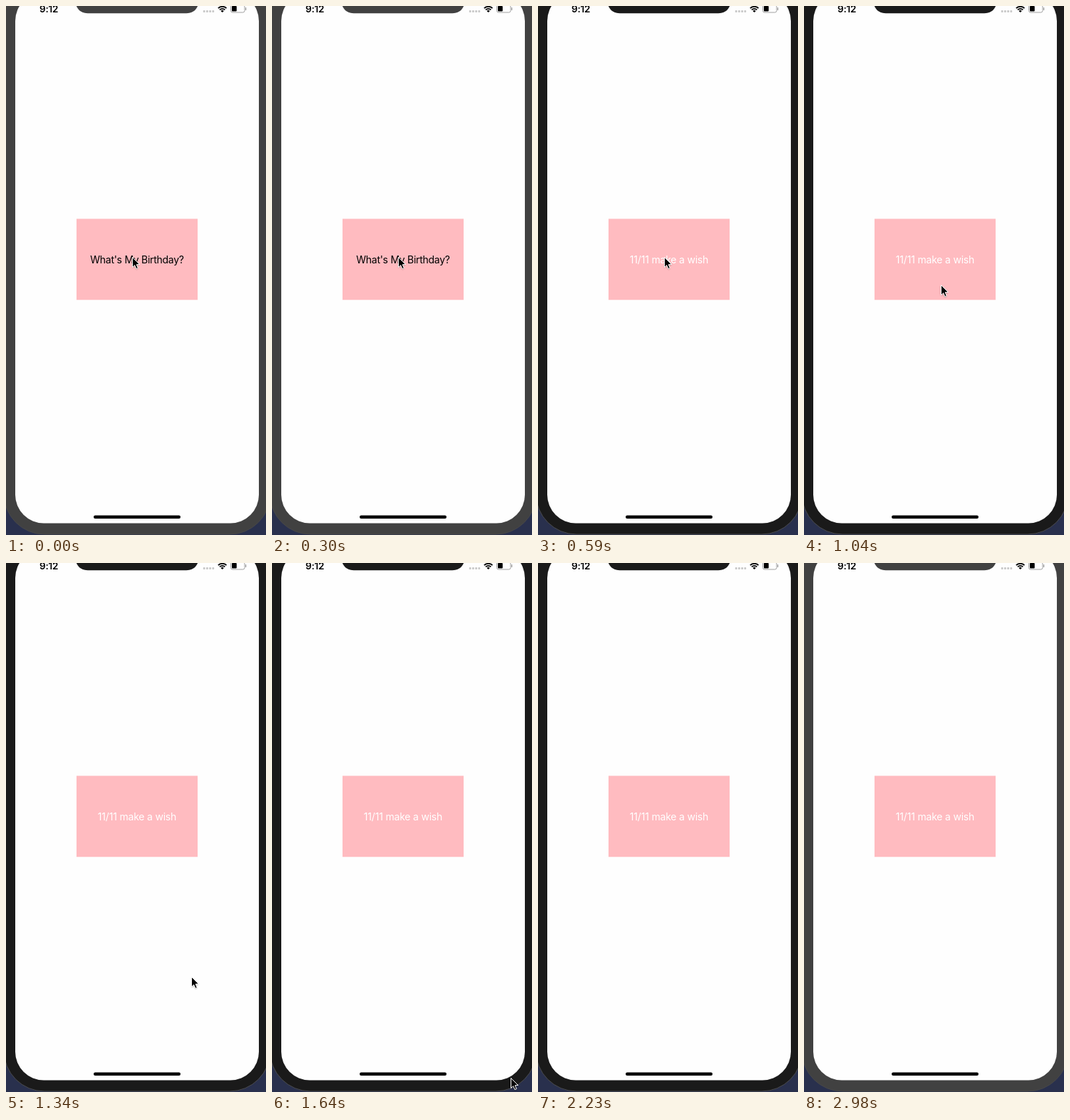
An HTML page with a canvas that plays this animation: 365 px wide and 742 px high, repeating every 3.08 s.

```html
<!DOCTYPE html>
<html lang="en">
<head>
<meta charset="utf-8">
<title>Birthday card</title>
<style>
html, body { margin: 0; width: 100%; height: 100%; overflow: hidden; background: #29304d; }
canvas { display: block; width: 365px; height: 742px; }
</style>
</head>
<body>
<canvas id="stage"></canvas>
<script>
const W = 365, H = 742, LOOP = 3080;
const canvas = document.getElementById('stage');
const ratio = window.devicePixelRatio || 1;
canvas.width = W * ratio;
canvas.height = H * ratio;
const ctx = canvas.getContext('2d');
const FONT = 'Inter, "Liberation Sans", sans-serif';

// [start ms, tip x, tip y]; the pointer jumps between these stops
const POINTER = [
  [0, 177, 352], [150, 176.5, 351.5], [300, 177, 352],
  [1040, 192, 391], [1190, 225, 478.5], [1340, 260, 580],
  [1490, 301, 681.5], [1640, 335, 722], [2080, 335, 732], [2230, 335, 760]
];

function box(x, y, w, h, r, fill) {
  ctx.beginPath();
  ctx.roundRect(x, y, w, h, r);
  ctx.fillStyle = fill;
  ctx.fill();
}

function label(text, x, y, font, color, spacing) {
  ctx.font = font + ' ' + FONT;
  ctx.letterSpacing = spacing + 'px';
  ctx.textAlign = 'center';
  ctx.textBaseline = 'alphabetic';
  ctx.fillStyle = color;
  ctx.fillText(text, x, y);
}

function phone(bezel, edge) {
  box(-3, -40, 374, 781, 57, bezel);
  ctx.strokeStyle = edge;
  ctx.lineWidth = 1;
  ctx.stroke();
  box(13, -19, 342, 744.5, 40, '#fefefe');

  // notch
  ctx.beginPath();
  ctx.moveTo(97.5, -20);
  ctx.lineTo(98, -4);
  ctx.bezierCurveTo(99, 5, 106, 10.3, 115, 10.3);
  ctx.lineTo(253, 10.3);
  ctx.bezierCurveTo(262, 10.3, 269, 5, 270, -4);
  ctx.lineTo(270.5, -20);
  ctx.fillStyle = bezel;
  ctx.fill();
}

function wifi(x, y) {
  const a = Math.PI * 0.25, up = -Math.PI / 2;
  ctx.strokeStyle = '#000';
  ctx.lineWidth = 1.8;
  for (const r of [8.2, 5.2]) {
    ctx.beginPath();
    ctx.arc(x, y, r, up - a, up + a);
    ctx.stroke();
  }
  ctx.beginPath();
  ctx.moveTo(x, y);
  ctx.arc(x, y, 3, up - a, up + a);
  ctx.fillStyle = '#000';
  ctx.fill();
}

function status() {
  label('9:12', 60.2, 9, '600 13.5px', '#000', -0.2);
  for (let i = 0; i < 4; i++) box(276.8 + i * 4.2, 6, 2.8, 3, 0.8, '#c9c9c9');
  wifi(303.7, 9);
  ctx.beginPath();
  ctx.roundRect(315.5, -1.5, 19.5, 10.5, 2.5);
  ctx.strokeStyle = '#a0a0a0';
  ctx.lineWidth = 1;
  ctx.stroke();
  box(317, 0, 6.8, 7.6, 1, '#000');
  box(336, 2, 1.3, 4, 0.6, '#a0a0a0');
}

function pointer(x, y) {
  ctx.save();
  ctx.translate(x, y);
  ctx.beginPath();
  ctx.moveTo(0.5, 0.5);
  for (const [px, py] of [[0.5, 14.6], [3.7, 11.6], [5.9, 16.6], [8.3, 15.6], [6.2, 10.7], [10.5, 10.5]]) {
    ctx.lineTo(px, py);
  }
  ctx.closePath();
  ctx.shadowColor = 'rgba(0,0,0,0.4)';
  ctx.shadowBlur = 2 * ratio;
  ctx.shadowOffsetY = ratio;
  ctx.fillStyle = '#000';
  ctx.fill();
  ctx.shadowColor = 'transparent';
  ctx.strokeStyle = '#fff';
  ctx.lineWidth = 1;
  ctx.stroke();
  ctx.restore();
}

function draw(t) {
  const active = t >= 450 && t < 2980;
  ctx.setTransform(ratio, 0, 0, ratio, 0, 0);
  ctx.fillStyle = '#29304d';
  ctx.fillRect(0, 0, W, H);
  phone(active ? '#1a1a1a' : '#414141', active ? '#4b4c50' : '#484849');
  status();
  box(99, 298.5, 170, 113.8, 0, '#ffbbc0');
  if (t < 590) label("What's My Birthday?", 184, 361, '400 14px', '#000', -0.28);
  else label('11/11 make a wish', 184, 361, '400 14px', '#fff', -0.2);
  box(123, 714.5, 122, 4.4, 2.2, '#000');
  const stop = POINTER.filter(p => p[0] <= t).pop();
  pointer(stop[1], stop[2]);
}

const start = performance.now();
function tick() {
  draw((performance.now() - start) % LOOP);
  requestAnimationFrame(tick);
}
tick();
</script>
</body>
</html>
```
